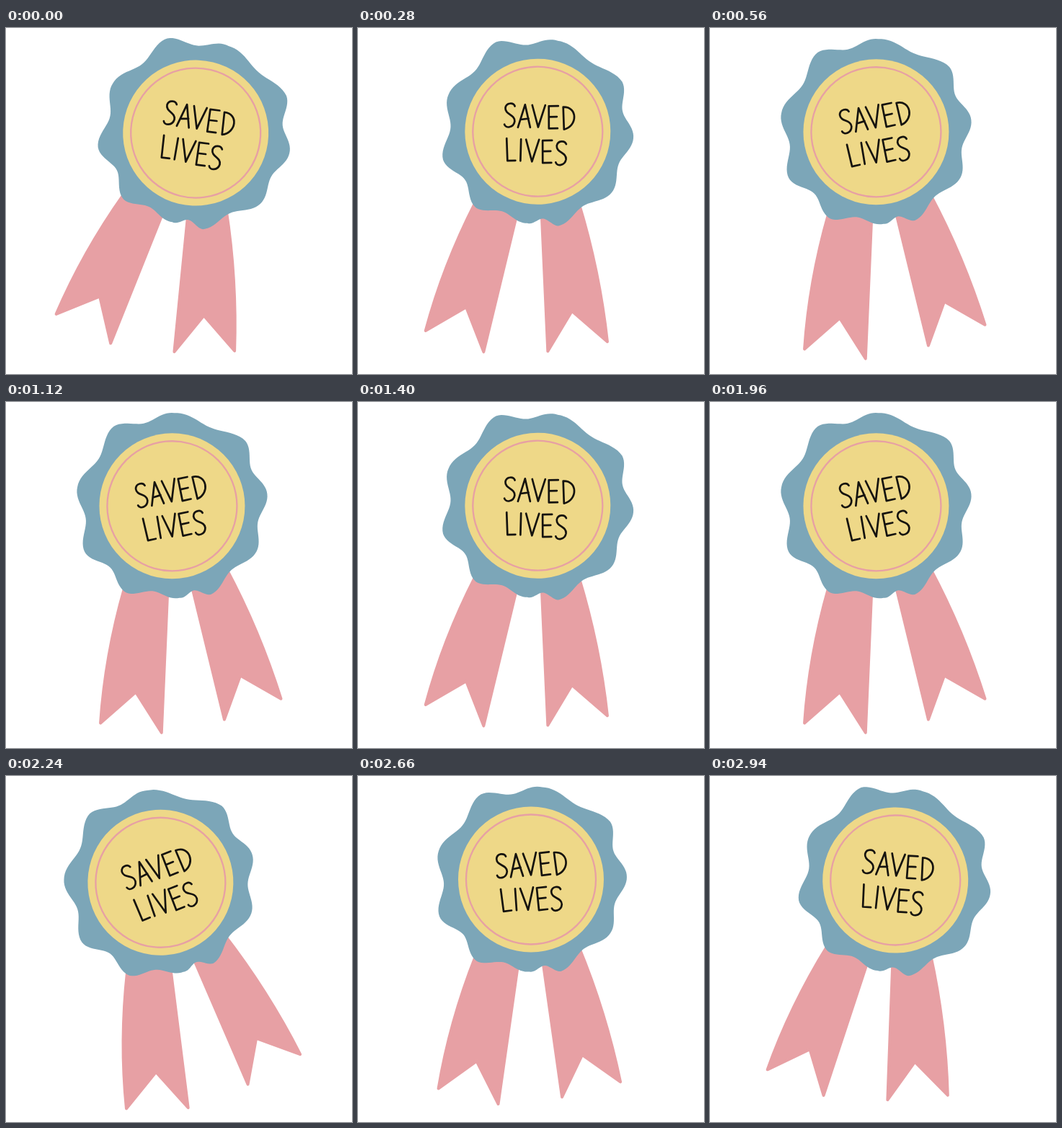
Animation of 480 by 480 pixels, one loop 3080 ms. Source, as an HTML page:

```html
<!DOCTYPE html>
<html lang="en">
<head>
<meta charset="utf-8">
<title>Saved lives</title>
<style>
  html, body { margin: 0; height: 100%; overflow: hidden; background: #fff; }
  svg { display: block; width: 100%; height: 100%; }
  path { stroke-linejoin: round; stroke-linecap: round; }
  .ribbon { fill: #e7a0a4; stroke: #e7a0a4; stroke-width: 4; }
  #letters { fill: none; stroke: #15130f; stroke-width: 2.7; }
</style>
</head>
<body>
<svg viewBox="0 0 480 480" role="img" aria-label="SAVED LIVES">
  <g id="badge">
    <path class="ribbon" d="M163 250Q127 341 111.500 433.500L164.500 395.500L194.500 455L222 262Z"/>
    <path class="ribbon" d="M256.500 258L283 445.500L311 387L364 424.500Q344 328 306 236Z"/>
    <g transform="translate(240 143.500)">
      <path id="rosette" fill="#7ca6b8"/>
      <circle r="101" fill="#eed888"/>
      <circle r="90" fill="none" stroke="#e7a0a4" stroke-width="2.300"/>
    </g>
    <g id="letters"></g>
  </g>
</svg>
<script>
const STEP = 140, STEPS = 22, SWING = 6;
const DIP = 121;

// Wave crests of the rosette: angle in degrees, radius
const CRESTS = [
  [-83, 129], [-36, 136], [-1.5, 133], [34, 133], [72, 134],
  [91, 128], [123.5, 136], [158, 137], [197, 134], [239.5, 137], [277, 129]
];

// Pen strokes and advance of each letter
const GLYPHS = {
  S: ["M13 3C11-2 1-2 0 6C0 16 14 14 14 24C13 33 2 35 0 29", 19],
  A: ["M0 32L8 0L17 31M3 21L14 19", 18],
  V: ["M0 0L10 30L18-1", 23],
  E: ["M13-1L0 0L2 31L14 30M1 15L12 14", 20],
  D: ["M0 0L3 31C22 25 20-2 0 0", 20],
  L: ["M0 0L3 31L14 30", 20],
  I: ["M0 0L1 30", 7]
};

const get = id => document.getElementById(id);
const mix = (a, b, t) => a + (b - a) * t;

// Cosine waves that fall to DIP halfway between neighbouring crests
function rosette() {
  const points = [], parts = 24;
  for (let i = 0; i < CRESTS.length - 1; i++) {
    const [a0, r0] = CRESTS[i], [a1, r1] = CRESTS[i + 1];
    for (let j = 0; j < parts; j++) {
      const t = j / parts, angle = mix(a0, a1, t) * Math.PI / 180;
      const r = mix(DIP, mix(r0, r1, t), (1 + Math.cos(2 * Math.PI * t)) / 2);
      points.push([r * Math.cos(angle), r * Math.sin(angle)]);
    }
  }
  return "M" + points.join("L") + "Z";
}

function write(word, x, y) {
  let pen = 0, strokes = "";
  for (const letter of word) {
    const [d, advance] = GLYPHS[letter];
    strokes += `<path d="${d}" transform="translate(${pen})"/>`;
    pen += advance;
  }
  get("letters").innerHTML += `<g transform="translate(${x} ${y}) rotate(-2)">${strokes}</g>`;
}

// One full swing, then a shorter one that turns back a step early
function pose(k) {
  return SWING - Math.abs((k < 12 ? 6 : 16) - k);
}

function angle(k) {
  const u = pose(k) / SWING;
  return 13.7 - 29 * (u ** 1.08 - 0.025 * Math.sin(2 * Math.PI * u));
}

function draw() {
  const k = Math.floor(performance.now() / STEP) % STEPS;
  get("badge").setAttribute("transform", `rotate(${angle(k)} 243 241)`);
  requestAnimationFrame(draw);
}

get("rosette").setAttribute("d", rosette());
write("SAVED", 192, 109);
write("LIVES", 198, 157);
draw();
</script>
</body>
</html>
```
